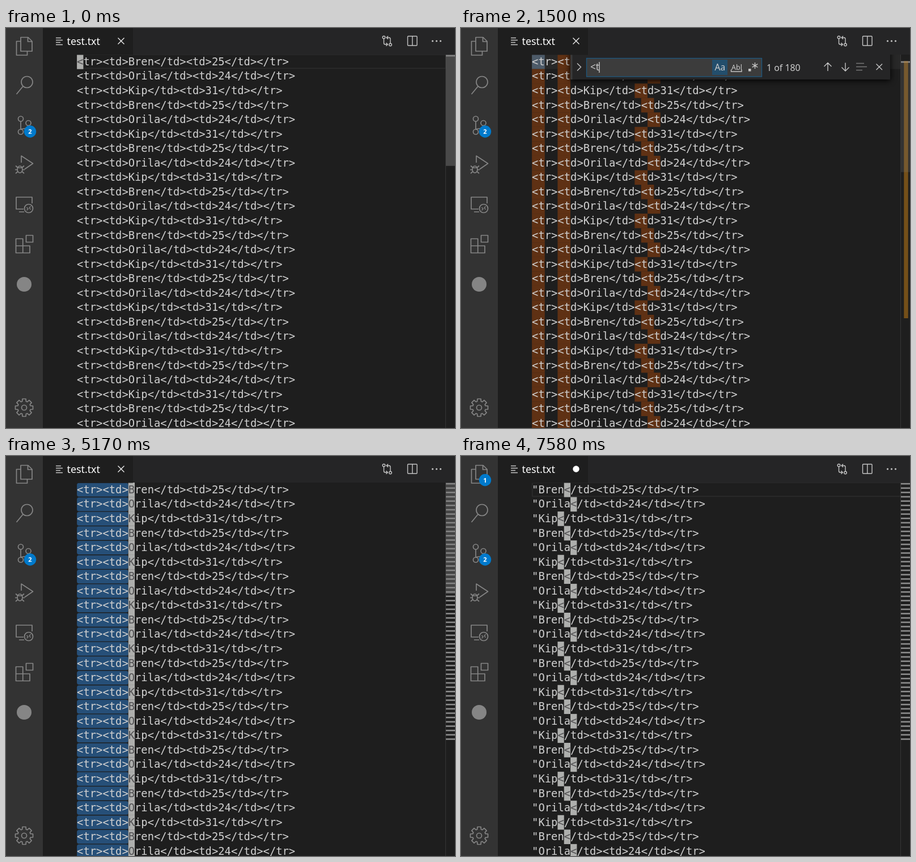
Write an HTML page that moves like this. It is 792 px wide and 707 px high and loops after 8 s.

```html
<!DOCTYPE html>
<html lang="en">
<head>
<meta charset="utf-8">
<title>Multi-cursor edit</title>
<style>
  html, body { margin: 0; width: 100%; height: 100%; overflow: hidden; background: #1e1e1e; }
  svg { display: block; }
  text { white-space: pre; }
  .code { font: 18.82px "DejaVu Sans Mono", monospace; fill: #d0d0d0; }
  .ui { font: 17.2px "Noto Sans", "Open Sans", sans-serif; fill: #ccc; }
  .line { fill: none; stroke: #858585; stroke-width: 1.7; stroke-linejoin: round; }
  .thin { fill: none; stroke: #c5c5c5; stroke-width: 1.4; }
  .badge { font: bold 11px "Noto Sans", sans-serif; fill: #fff; text-anchor: middle; }
  #widget { filter: drop-shadow(0 2.7px 5.4px #000); }
</style>
</head>
<body>
<svg id="stage" width="792" height="707">
  <rect width="792" height="707" fill="#1e1e1e"/>
  <g id="editor"></g>
  <path d="M775.5 47V707" stroke="#363636"/>
  <g id="ruler"></g>
  <svg id="find" y="47" width="792" height="660">
    <g id="widget">
      <rect x="193" y="-10" width="564" height="54" fill="#252526"/>
      <rect x="193" y="-10" width="3.5" height="54" fill="#3a3a3a"/>
      <rect x="221" y="6" width="310" height="33.5" fill="#3c3c3c"/>
      <rect id="focus" x="221.5" y="6.5" width="309" height="32.5" fill="none" stroke="#1d577f" stroke-width="1.3"/>
      <rect x="443" y="9" width="27" height="27" fill="#234e6c"/>
      <text class="ui" x="447.5" y="27.5" style="font-size:15.5px">Aa</text>
      <text class="ui" x="477" y="26.5" style="font-size:12.5px">Abl</text>
      <path class="thin" d="M476.500 26.500V30H495V26.500" stroke-width="1.2"/>
      <rect x="507" y="25" width="4.500" height="4.500" fill="#c5c5c5"/>
      <path class="thin" d="M518.500 14V25M513.700 16.700L523.300 22.300M523.300 16.700L513.700 22.300"/>
      <path class="thin" d="M205 15.500L211.500 22L205 28.500M647 29V14.500M640.500 21L647 14.500L653.500 21M678 14.500V29M671.500 22.500L678 29L684.500 22.500M732.500 16.500L743 27M743 16.500L732.500 27"/>
      <path class="thin" d="M697 15.500H711M697 21.500H716M697 27.500H708" style="stroke:#777"/>
      <text id="query" class="ui" x="228" y="28"></text>
      <rect id="caret" y="13" width="1.400" height="19" fill="#ccc"/>
      <text id="count" class="ui" x="539" y="29" style="font-size:15.9px"></text>
    </g>
  </svg>

  <rect x="65" width="727" height="47" fill="#252526"/>
  <rect x="65" width="159" height="47.500" fill="#1e1e1e"/>
  <path class="thin" d="M88 17.500H97M88 21.500H100M88 25.500H96M88 29.500H100"/>
  <text class="ui" x="107.500" y="29.500" style="fill:#fff;font-size:17.8px">test.txt</text>
  <path id="close" class="thin" d="M197.500 17.500L208.500 28.500M208.500 17.500L197.500 28.500" style="stroke:#eee"/>
  <circle id="dirty" cx="203" cy="23" r="5.700" fill="#fff"/>
  <g class="thin">
    <circle cx="666.500" cy="16.500" r="2.300"/><circle cx="678" cy="29.500" r="2.300"/>
    <path d="M666.500 19V26.500Q666.500 29 669 29H673M670.500 26.300L673.300 29L670.500 31.700M678 27V19.500Q678 17 675.500 17H671.500M674 14.300L671.200 17L674 19.700"/>
    <rect x="708.500" y="14.500" width="16.500" height="16.500" rx="1"/><path d="M716.800 14.500V31"/>
  </g>
  <g fill="#c5c5c5"><circle cx="752.500" cy="23" r="1.600"/><circle cx="759.500" cy="23" r="1.600"/><circle cx="766.500" cy="23" r="1.600"/></g>

  <rect width="65" height="707" fill="#333"/>
  <g class="line">
    <path d="M26 16.500H39L46 23.500V41H26ZM38.500 16.500V24H46M26 23.500H18.500V48H37.500V41"/>
    <circle cx="37" cy="95.500" r="10"/><path d="M30 103L18.500 117"/>
    <circle cx="26" cy="160.500" r="4.500"/><circle cx="39.500" cy="168" r="4.500"/><circle cx="26" cy="183.500" r="4.500"/>
    <path d="M26 165V179M39.500 172.500Q38 178 31 178Q27 178 26 180"/>
    <path d="M27 238V226L47.500 239.500L33 249.500"/>
    <ellipse cx="24.500" cy="250" rx="4.500" ry="6"/>
    <path d="M20 247H29M17 243.500L20.500 246.500M32 243.500L28.500 246.500M16 250.500H20M29 250.500H33M17 257L20.500 254M32 257L28.500 254"/>
    <path d="M31 320H18V299H46V310M23 325H32"/><circle cx="40" cy="319" r="7.500"/>
    <path d="M36.500 317L39 319.700L36.500 322.400M43.500 315.300L41 318L43.500 320.700" stroke-width="1.300"/>
    <path d="M17.500 372.500H29.700V397.500H17.500ZM17.500 385H42V397.500H29.500"/><rect x="35.500" y="366.500" width="12" height="12"/>
    <path id="gear"/><circle cx="32" cy="671" r="4.500"/>
  </g>
  <circle cx="32" cy="453" r="13" fill="#858585"/>
  <circle cx="42.500" cy="183" r="10.700" fill="#007acc"/><text class="badge" x="42.500" y="187">2</text>
  <g id="unsaved"><circle cx="42.500" cy="42.500" r="10.700" fill="#007acc"/><text class="badge" x="42.500" y="46.500">1</text></g>
</svg>

<script>
const $ = id => document.getElementById(id);
const LEFT = 125.1, TOP = 47, CHAR = 11.33, ROW = 25.555, LINES = 60, TICKS = 96;
const people = [["Bren", 25], ["Orila", 24], ["Kip", 31]];
const keys = [[12, "<"], [17, "t"], [20, "r"], [25, ">"], [27, "<"], [28, "t"], [30, "d"], [37, ">"]];

// Ticks (1/12 s) at which the editing steps happen
const OPEN = 8, SELECT = 44, CLOSE = 56, DELETE = 69, QUOTE = 84, JUMP = 91;

const clamp = v => Math.max(0, Math.min(1, v));
const esc = s => s.replace(/</g, "&lt;").replace(/>/g, "&gt;");
const rect = (x, y, w, h, fill, more = "") =>
  `<rect x="${x}" y="${y}" width="${w}" height="${h}" fill="${fill}" ${more}/>`;
const show = (id, on) => $(id).setAttribute("visibility", on ? "visible" : "hidden");
const pen = document.createElement("canvas").getContext("2d");
pen.font = '17.2px "Noto Sans", "Open Sans", sans-serif';

function lineText(i, k) {
  const [name, age] = people[i % 3];
  const head = k < DELETE ? "<tr><td>" : k < QUOTE ? "" : '"';
  return `${head}${name}</td><td>${age}</td></tr>`;
}

function matches(text, query) {
  const cols = [];
  if (query) for (let c = text.indexOf(query); c >= 0; c = text.indexOf(query, c + query.length)) cols.push(c);
  return cols;
}

function cursorCol(i, k) {
  if (k < OPEN) return i ? -1 : 0;
  if (k < SELECT) return -1;
  if (k < DELETE) return 8;
  return k < QUOTE ? 0 : k < JUMP ? 1 : 1 + people[i % 3][0].length;
}

function drawEditor(k, query) {
  const colX = c => LEFT + c * CHAR;
  let out = "";
  if (k < OPEN || k >= DELETE)
    out += rect(LEFT + .7, TOP, 650, ROW - 1.2, "none", 'stroke="#2a2a2a" stroke-width="2"');
  if (query) out += rect(LEFT, TOP, 651, ROW, "#ffffff0b");
  for (let i = 0; i < 26; i++) {
    const y = TOP + i * ROW, text = lineText(i, k), base = Math.round(y + 18.86);
    matches(text, query).forEach((c, n) => {
      out += rect(colX(c), y, query.length * CHAR, ROW + .1, i || n ? "#5f3114" : "#4d5b69");
    });
    if (k >= SELECT && k < DELETE) {
      const fill = k >= CLOSE ? "#264f78" : i ? "#694b44" : "#4d5b69";
      out += rect(LEFT, y + .7, 8 * CHAR, ROW - 1.4, fill, 'rx="3.5"');
    }
    out += `<text class="code" x="${LEFT}" y="${base}">${esc(text)}</text>`;
    const c = cursorCol(i, k);
    if (c >= 0) out += rect(colX(c), y, CHAR, ROW + .1, "#aeafad") +
      `<text class="code" x="${colX(c)}" y="${base}" style="fill:#515052">${esc(text[c])}</text>`;
  }
  $("editor").innerHTML = out;
}

function drawRuler(k, query) {
  const top = k > OPEN && k < CLOSE ? 58 : TOP;
  const fade = k < CLOSE ? 1 - (k - 13) / 9.6 : 1 - (k - 61) / 9.6;
  let out = "";
  for (let i = 0; i < (k < SELECT ? 1 : LINES); i++)
    out += rect(776, top + .8 + i * 7.65, 16, 2.6, "#a0a0a0", 'opacity=".85"');
  if (query) out += rect(781.3, top + .5, 7.4, 454.5, "#d18616", 'opacity=".49"');
  out += rect(776, top, 16, 196.7, "#797979", `opacity="${.47 * clamp(fade)}"`);
  $("ruler").innerHTML = out;
}

function drawFind(k, query, typed) {
  const shown = k < SELECT ? clamp((k - OPEN + .3) / 2.4) : 1 - clamp((k - CLOSE + .3) / 2);
  show("find", k >= OPEN && shown > 0);
  $("widget").setAttribute("transform", `translate(0 ${(shown - 1) * 54})`);
  $("query").textContent = typed;
  $("caret").setAttribute("x", 227.2 + pen.measureText(typed).width);
  const focused = k >= OPEN && k < SELECT;
  $("focus").setAttribute("opacity", +focused);
  $("caret").setAttribute("opacity", +focused);
  const total = LINES * matches(lineText(0, 0), typed).length;
  $("count").textContent = total ? `1 of ${total}` : "No results";
}

function draw(k) {
  const typed = keys.filter(([at]) => at <= k).map(([, ch]) => ch).join("");
  const query = k < CLOSE ? typed : "";
  drawEditor(k, query);
  drawRuler(k, query);
  drawFind(k, query, typed);
  show("close", k < DELETE + 1);
  show("dirty", k >= DELETE + 1);
  show("unsaved", k >= DELETE + 3);
}

const gear = [];
for (let i = 0; i < 8; i++)
  for (const [turn, r] of [[-.3, 11.5], [-.19, 15.8], [.19, 15.8], [.3, 11.5]]) {
    const a = i * Math.PI / 4 + turn;
    gear.push(`${(32 + r * Math.cos(a)).toFixed(1)} ${(671 + r * Math.sin(a)).toFixed(1)}`);
  }
$("gear").setAttribute("d", `M${gear.join("L")}Z`);

let last = -1;
function loop() {
  const k = Math.floor((performance.now() + 4) * 12 / 1000) % TICKS;
  if (k !== last) draw(last = k);
  requestAnimationFrame(loop);
}
loop();
</script>
</body>
</html>
```
